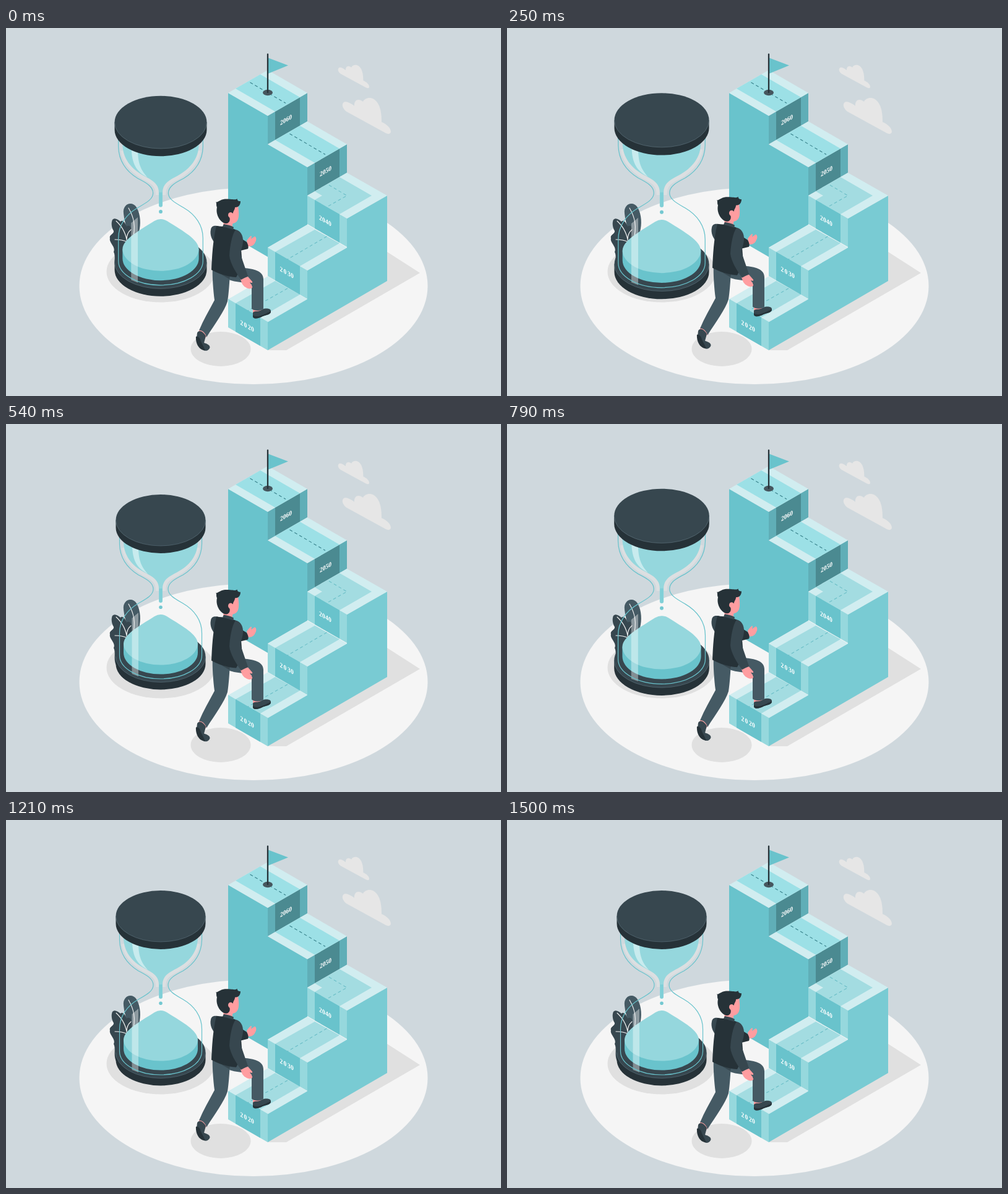
These frames come from a looping animation (800x595 px, 1540 ms). An HTML page without scripts:

```html
<!DOCTYPE html>
<html lang="en">
<head>
<meta charset="utf-8">
<title>Climbing the years</title>
<style>
  @property --phase { syntax: "<number>"; inherits: true; initial-value: 0; }

  html, body { margin: 0; width: 100%; height: 100%; overflow: hidden; background: #cfd8dd; }
  svg { display: block; width: 100vw; height: 100vh; }

  /* One shared clock, advanced at the film's frame rate. */
  .scene { animation: clock 1540ms steps(37, start) -4ms infinite; }
  @keyframes clock { from { --phase: 0; } to { --phase: 1; } }

  /* Two linear beats: peak at 10% (slow fall) and at 50%. */
  .hourglass {
    --beat1: max(0, min(var(--phase) * 10, 1.5 - var(--phase) * 5));
    --beat2: max(0, min(var(--phase) * 10 - 4, 6 - var(--phase) * 10));
    transform-origin: 250px 271.5px;
    transform: scale(calc(1 + .1 * (var(--beat1) + var(--beat2))));
  }

  /* Smooth rise and fall over the whole loop. */
  .man {
    --up: min(2 * var(--phase), 2 - 2 * var(--phase));
    transform: translateY(calc(-10px * var(--up) * var(--up) * (3 - 2 * var(--up))));
  }

  .shade { fill: #e0e0e0; }
  .teal { fill: #69c3cc; }
  .sand { fill: #95d7dd; }
  .edge { fill: #d1edf0; }
  .dark { fill: #263238; }
  .slate { fill: #37474f; }
  .trousers { fill: #455a64; }
  .skin { fill: #ff9da0; }
  .line { fill: none; stroke: #69c3cc; stroke-width: 1.2; }
  .dash { fill: none; stroke-width: 1.1; stroke-dasharray: 5 4; }
  .vein { fill: none; stroke: #f5f5f5; stroke-width: 1.1; stroke-linecap: round; }
  text { font: bold 11px "Liberation Serif", "Times New Roman", serif; fill: #fff; }
</style>
</head>
<body>
<svg class="scene" viewBox="0 0 800 595" preserveAspectRatio="none">
  <defs>
    <path id="cloud" d="M545 121C548 117 556 121 563 126C562 118 568 112 577 119C583 108 608 109 607 152C616 156 622 162 622 168C621 172 617 172 612 169L550 135C545 131 542 125 545 121Z"/>
    <path id="glass" d="M183.5 178V194C184 215 193 231 214 244C228 251 238 257 238 267C238 277 226 283 214 290C195 301 183.5 318 183.5 338V374A66.5 38 0 0 0 250 412"/>
    <path id="wall" d="M190 200C192 215 203 231 222 242C238 250 245 254 245 270"/>
    <g id="disc">
      <path class="dark" d="M177.5 155.5v12a72.5 41.5 0 0 0 145 0v-12z"/>
      <ellipse class="slate" cx="250" cy="155.5" rx="72.5" ry="41.5"/>
      <path d="M177.5 155.5a72.5 41.5 0 0 0 145 0" fill="none" stroke="#78909c" stroke-width=".4"/>
    </g>
    <path id="top" d="M359 105l64-37 64 37-64 37z"/>
    <path id="lane-down" d="M371 98l40-23 64 37-40 23z"/>
    <path id="lane-up" d="M371 445l40 23 64-37-40-22z"/>
    <path id="riser" d="M359 438l64 37v46l-64-37z"/>
    <path id="panel" d="M371 445l40 23v46l-40-23z"/>
  </defs>

  <ellipse cx="400" cy="417" rx="281.5" ry="159" fill="#f5f5f5"/>
  <g class="shade">
    <ellipse cx="250" cy="394" rx="87.5" ry="49.5"/>
    <ellipse cx="347" cy="519" rx="48.5" ry="28"/>
    <path d="M423 521h30l216-125-53-34z"/>
  </g>
  <g fill="#e6e6e6">
    <use href="#cloud"/>
    <use href="#cloud" transform="translate(186.5 -13) scale(.644)"/>
  </g>

  <!-- Stairs -->
  <path class="teal" d="M359 105l64 37v46l64 37v93l-64 37v15l-64-37z"/>
  <path d="M423 475l64-37v-46l64-37v-47l65-37v138l-193 112z" fill="#79cbd3"/>
  <path d="M423 142l64-37v46l-64 37zM487 225l64-37v46l-64 37z" fill="#60aeb7"/>
  <path d="M435 135l40-23v46l-40 23zM499 218l40-23v46l-40 23z" fill="#4b8a91"/>
  <g class="edge">
    <use href="#top"/>
    <use href="#top" x="64" y="83"/>
    <path d="M487 271l64-37 65 37-65 37z"/>
    <use href="#top" x="64" y="250"/>
    <use href="#top" y="333.5"/>
  </g>
  <g fill="#9ce0e6">
    <use href="#lane-down"/>
    <use href="#lane-down" x="64" y="83"/>
  </g>
  <g fill="#a3dce1">
    <path d="M499 264l40-23 52 30-52 30-40-23 12-7z"/>
    <use href="#lane-up" x="64" y="-83"/>
    <use href="#lane-up"/>
  </g>
  <g fill="#96d8dd">
    <use href="#riser" x="128" y="-167"/>
    <use href="#riser" x="64" y="-83"/>
    <use href="#riser"/>
  </g>
  <g class="teal">
    <use href="#panel" x="128" y="-167"/>
    <use href="#panel" x="64" y="-83"/>
    <use href="#panel"/>
  </g>
  <path class="dash" stroke="#37818b" d="M394.5 88L452 121.500M458.500 171L516 204.500"/>
  <path class="dash" stroke="#69bdc6" d="M522 254l29 17-32 18M518.500 337L455 374M455 421L391 457"/>
  <g>
    <text transform="matrix(.866 -.5 0 1 443 157.500)">2060</text>
    <text transform="matrix(.866 -.5 0 1 507 240.500)">2050</text>
    <text transform="matrix(.866 .5 0 1 506 309.500)" letter-spacing=".3">2040</text>
    <text transform="matrix(.866 .5 0 1 442.500 392.500)" dx="0 1.500 1.800 .3">2030</text>
    <text transform="matrix(.866 .5 0 1 378.500 479)" dx="0 1.500 1.800 .3">2020</text>
  </g>

  <!-- Flag -->
  <ellipse cx="423" cy="104.500" rx="8" ry="4.700" fill="#46565e"/>
  <path class="teal" d="M423 48l33 12.500-33 13.500z"/>
  <path d="M423 42.500V104" stroke="#263238" stroke-width="2.300" stroke-linecap="round"/>

  <!-- Plant -->
  <path d="M190 300C188 284 204 279 211 290C218 302 218 318 215 329C212 342 206 350 199 354C200 332 192 320 190 300Z" fill="#455a64"/>
  <path class="slate" d="M172 310C176 306 181 310 185 313C189 309 193 316 195 321C198 318 203 321 203 326C206 330 204 340 200 346L197 390H178C173 380 178 370 174 362C178 354 166 347 168 340C166 334 175 333 174 328C170 322 170 314 172 310Z"/>
  <path class="vein" d="M198 291C206 305 211 320 204 345M178 312C189 322 195 335 196 350M176 342C185 342 190 343 196 346M202 326C196 331 195 338 195 342"/>

  <g class="hourglass">
    <use href="#disc" y="220.500"/>
    <path class="teal" d="M190 355v15a60 34.600 0 0 0 120 0v-15z"/>
    <path class="sand" d="M190 355C191 340 213 328 240 311Q250 305 260 311C287 328 309 340 310 355A60 34.600 0 0 1 190 355Z"/>
    <path d="M203.500 314L214 305V408L203.500 404Z" fill="#fff" opacity=".38"/>
    <g fill="none" stroke="#dcdfe1" stroke-width="6">
      <use href="#wall"/>
      <use href="#wall" transform="matrix(-1 0 0 1 500 0)"/>
    </g>
    <path class="sand" d="M190 178V190C190 212 203 229 224 240C238 247 247 253 247 266V286a3 3 0 0 0 6 0V266C253 253 262 247 276 240C297 229 310 212 310 190V178Z"/>
    <path d="M247.500 266h5v20a2.500 2.500 0 0 1-5 0z" fill="#80cfd7"/>
    <circle cx="250" cy="296.300" r="2.800" fill="#74c8d1"/>
    <path d="M204 195L214 199C214 222 220 232 229 242C213 234 204 222 204 195Z" fill="#fff" opacity=".48"/>
    <g class="line">
      <use href="#glass"/>
      <use href="#glass" transform="matrix(-1 0 0 1 500 0)"/>
    </g>
    <use href="#disc"/>
  </g>

  <g class="man">
    <!-- Rear leg and shoe -->
    <path class="skin" d="M313 487L326 496L322 501L311 492Z"/>
    <path class="slate" d="M309 493C312 487 319 491 323 498L320 509C327 511 331 514 329 518C326 523 320 523 317 519L308 502Z"/>
    <path class="dark" d="M307 499C311 498 314 502 315 507L322 521C313 522 306 511 307 499Z"/>
    <path class="trousers" d="M334 386C333 400 335 425 337 440C328 457 319 472 312 489C317 488 323 494 324 500C338 478 353 458 358 442C360 430 361 412 362 398Z"/>
    <!-- Front leg and shoe -->
    <path class="skin" d="M399 452h13v8l-7 2-6-2z"/>
    <path class="slate" d="M399 460C403 456 408 460 414 455C419 453 427 453 428 457C429 462 421 464 415 466C408 470 401 471 399 467Z"/>
    <path class="dark" d="M399 464C407 470 418 462 428 458C429 463 421 464 415 466C408 470 401 471 399 467Z"/>
    <path class="trousers" d="M350 397L384 388C400 389 416 393 416 406V454C411 458 402 458 397 454V415C388 411 370 411 360 407Z"/>
    <path class="slate" d="M349 399L362 401L361 406Z"/>
    <!-- Far arm -->
    <path class="skin" d="M389 344C391 341 393 338 396 336C398 337 396 340 396 341L402 337C405 338 405 343 403 346C401 351 397 354 391 353Z"/>
    <path class="dark" d="M381 341L389 346Q393 353 391 357L379 360Z"/>
    <path class="slate" d="M331 326C332 319 339 319 345 321L338 348C333 343 329 334 331 326Z"/>
    <!-- Torso and near arm -->
    <path class="skin" d="M352 308L367 312L365 325L351 320Z"/>
    <path class="dark" d="M340 320C352 321 362 322 371 326L379 345L382 384L372 403C356 402 343 397 332 391C333 370 334 345 340 320Z"/>
    <path class="slate" d="M350 321L352 317C357 318 363 319 368 322L367 326Z"/>
    <path class="skin" d="M379 406L391 402L398 410C399 413 396 412 394 411L398 418C399 422 393 423 387 419C383 417 381 413 379 406Z"/>
    <path class="slate" d="M371 326C378 327 384 335 383 346C382 357 378 361 379 366L391 401L380 407C372 396 362 380 361 368C362 352 365 335 371 326Z"/>
    <!-- Head -->
    <path class="skin" d="M362 288L375 287C376 295 377 303 375 309C373 315 367 317 362 316L354 311Z"/>
    <path class="dark" d="M341 290C339 286 341 284 339 281C341 283 343 280 346 279C352 275 362 277 366 277C370 278 374 277 374 275.500C373 278 376 281 379 280C379 287 375 290 370 290C370 294 367 296 367 299L361 306C363 310 361 315 357 316C348 317 338 303 341 290Z"/>
    <ellipse class="skin" cx="363" cy="302.500" rx="4" ry="4.500"/>
  </g>
</svg>
</body>
</html>
```
